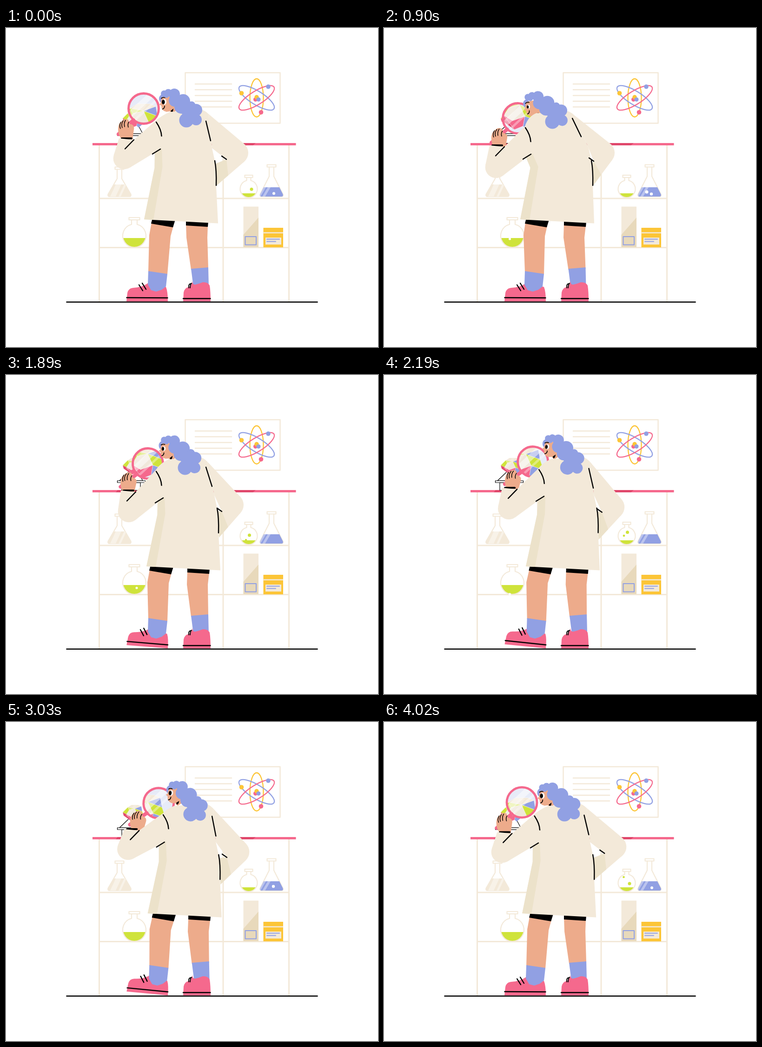
Write an HTML page with a canvas that moves like this. It is 800 px wide and 685 px high and loops after 4050 ms.

```html
<!DOCTYPE html>
<html lang="en">
<head>
<meta charset="utf-8">
<title>Lab researcher</title>
<style>
html, body { margin: 0; width: 100%; height: 100%; overflow: hidden; background: #fff; }
canvas { display: block; width: 800px; height: 685px; }
</style>
</head>
<body>
<canvas id="stage"></canvas>
<script>
const LOOP = 4050, STEP = 30;
const COAT = '#f3e9d9', SHADE = '#ece2ca', SKIN = '#edab8b', LILAC = '#91a0e3',
  PINK = '#f5698d', ROSE = '#e0486c', LIME = '#cfe33b', YELLOW = '#fcc537', INK = '#000';

const canvas = document.getElementById('stage');
const g = canvas.getContext('2d');
const ratio = window.devicePixelRatio || 1;
canvas.width = 800 * ratio;
canvas.height = 685 * ratio;
g.scale(ratio, ratio);
g.lineCap = g.lineJoin = 'round';

// Pose columns: start, lean in, closest, step back, furthest, upright
const TIMES = [0, 900, 1380, 1480, 1890, 2610, 3540];
const COLUMN = [0, 1, 2, 2, 3, 4, 5];
const HEAD = {
  x: [388, 362, 360, 385, 401, 390], y: [198, 201, 203, 199, 198, 198],
  turn: [0, -5, -5.5, 3, 9, 5], eye: [1, .65, .55, .8, .85, 1], drop: [0, 3, 3, 1, 0, 0]
};
const GLASS = {
  x: [296, 288, 287, 305, 334, 314], y: [173, 194, 195, 190, 181, 169],
  turn: [0, 3, 3, 5, 9, 8],
  gemX: [288, 284, 284, 297, 298, 296], gemY: [197, 184, 184, 188, 190, 192]
};
const ARM = {
  elbowX: [254, 241, 240, 264, 271, 251], elbowY: [280, 299, 300, 293, 279, 269],
  wristX: [275, 259, 257, 279, 291, 278], wristY: [240, 255, 257, 251, 238, 230],
  shoulderX: [323, 304, 301, 323, 341, 331], shoulderY: [202, 214, 216, 207, 200, 199],
  pitX: [332, 316, 314, 338, 348, 331], pitY: [260, 271, 272, 264, 258, 258]
};
const BODY = {
  seamX: [430, 405, 402, 430, 448, 434], seamY: [200, 194, 194, 198, 203, 201],
  seamRun: [10, 19, 20, 13, 7, 10],
  elbowX: [496, 471, 467, 486, 497, 499], elbowY: [268, 268, 268, 279, 287, 268],
  foldX: [464, 441, 443, 454, 463, 466], foldY: [275, 279, 283, 286, 289, 276],
  sideX: [449, 446, 444, 454, 460, 452], sideY: [285, 285, 283, 286, 285, 285],
  hem: [0, -4, -5, 5, 10, 3]
};
const LEGS = {
  thighL: [0, -9, -10, -4, 2, 1], kneeL: [0, -8, -9, -4, 0, 1], sockL: [0, -3, -3, 0, 3, 1],
  thighR: [0, 0, 0, 3, 6, 3], kneeR: [0, -2, -2, 1, 4, 1], sockR: [0, -1.5, -1.5, 0, 2, 1],
  toe: [0, 0, 0, 4.5, 6.5, 2.5]
};

// Monotone cubic through a looping track
function sample(values, t) {
  const n = TIMES.length;
  const time = i => TIMES[(i + n) % n] + LOOP * Math.floor(i / n);
  const val = i => values[COLUMN[(i + n) % n]];
  const slope = i => (val(i + 1) - val(i)) / (time(i + 1) - time(i));
  const tangent = i => {
    const a = slope(i - 1), b = slope(i);
    return a * b > 0 ? 2 * a * b / (a + b) : 0;
  };
  let i = n - 1;
  while (TIMES[i] > t) i--;
  const h = time(i + 1) - time(i), u = (t - time(i)) / h, v = 1 - u;
  return v * v * (1 + 2 * u) * val(i) + u * u * (3 - 2 * u) * val(i + 1)
    + h * u * v * (v * tangent(i) - u * tangent(i + 1));
}
const pose = (track, t) =>
  Object.fromEntries(Object.entries(track).map(([k, v]) => [k, sample(v, t)]));

function trace(points) {
  g.beginPath();
  points.forEach(([x, y]) => g.lineTo(x, y));
}
function poly(color, ...points) {
  trace(points);
  g.closePath();
  g.fillStyle = color;
  g.fill();
}
function line(color, width, ...points) {
  trace(points);
  g.strokeStyle = color;
  g.lineWidth = width;
  g.stroke();
}
function rect(color, x, y, w, h) {
  g.fillStyle = color;
  g.fillRect(x, y, w, h);
}
function frame(color, width, x, y, w, h) {
  g.strokeStyle = color;
  g.lineWidth = width;
  g.strokeRect(x, y, w, h);
}
function disc(color, x, y, rx, ry = rx) {
  g.beginPath();
  g.ellipse(x, y, rx, ry, 0, 0, 7);
  g.fillStyle = color;
  g.fill();
}
function fillPath(color, d) {
  g.fillStyle = color;
  g.fill(new Path2D(d));
}
function strokePath(color, width, d) {
  g.strokeStyle = color;
  g.lineWidth = width;
  g.stroke(new Path2D(d));
}
function group(x, y, degrees, ox, oy, draw) {
  g.save();
  g.translate(x, y);
  g.rotate(degrees * Math.PI / 180);
  g.translate(-ox, -oy);
  draw();
  g.restore();
}
function tangentPoint([px, py], cx, cy, r, side) {
  const dx = px - cx, dy = py - cy;
  const a = Math.atan2(dy, dx) + side * Math.acos(Math.min(1, r / Math.hypot(dx, dy)));
  return [cx + r * Math.cos(a), cy + r * Math.sin(a)];
}

function board() {
  frame(COAT, 2.5, 385.5, 96, 204, 108.5);
  for (let i = 0; i < 5; i++) line(COAT, 2.5, [407, 120.3 + i * 12.3], [485, 120.3 + i * 12.3]);
  [[YELLOW, 90, 41], [LILAC, 32, 44], [PINK, -32, 44]].forEach(([color, deg, a]) => {
    g.beginPath();
    g.ellipse(539, 150, a, 14.5, deg * Math.PI / 180, 0, 7);
    g.strokeStyle = color;
    g.lineWidth = 2.3;
    g.stroke();
  });
  disc(PINK, 536.5, 153.5, 4.5);
  disc(YELLOW, 539, 148.5, 4.7);
  disc(LILAC, 543, 153.5, 4.5);
  disc(LILAC, 564, 126, 4.8);
  disc(YELLOW, 506.5, 140, 4.8);
  disc(PINK, 548.5, 181, 4.8);
}

function shelves() {
  [200.5, 467, 608.5].forEach(x => line(COAT, 3, [x, 252], [x, 587]));
  line(COAT, 3, [330.5, 252], [330.5, 366]);
  [366, 471.5].forEach(y => line(COAT, 3, [200.5, y], [608.5, y]));
  rect(PINK, 186, 247, 437.5, 5);
  poly(ROSE, [430, 247], [537, 247], [531, 252], [430, 252]);
  poly(ROSE, [240, 247], [286, 247], [282, 252], [236, 252]);
}

function liquid(path, color, top, stripes) {
  g.save();
  g.clip(path);
  rect(color, 200, top, 420, 80);
  g.globalAlpha = .38;
  stripes.forEach(([x, w]) => poly('#fff', [x, top], [x + w, top], [x + w - 13, 364], [x - 13, 364]));
  g.restore();
}
function cone(x, rim, color, top, stripes) {
  const path = new Path2D(`M${x - 5} ${rim + 5}V${rim + 25}L${x - 24.5} 357Q${x - 26} 362 ${x - 21} 362
    H${x + 21}Q${x + 26} 362 ${x + 24.5} 357L${x + 5} ${rim + 25}V${rim + 5}`);
  g.fillStyle = '#fff';
  g.fill(path);
  g.strokeStyle = COAT;
  g.lineWidth = 2.2;
  g.stroke(path);
  liquid(path, color, top, stripes);
  frame(COAT, 2.2, x - 9.5, rim, 19, 5);
}
function round(x, y, r, rim, half, rimHalf, top) {
  const neck = y - Math.sqrt(r * r - half * half);
  const path = new Path2D(`M${x - half} ${rim + 5}V${neck}A${r} ${r} 0 1 0 ${x + half} ${neck}V${rim + 5}`);
  g.fillStyle = '#fff';
  g.fill(path);
  liquid(path, LIME, top, []);
  g.strokeStyle = COAT;
  g.lineWidth = 2.2;
  g.stroke(path);
  frame(COAT, 2.2, x - rimHalf, rim, rimHalf * 2, 5);
}

// x, start y, start time, life, radius, speed, colour
const BUBBLES = [
  [270.5, 471, 470, 470, 2.5, .042, '#fff'], [282, 471, 905, 490, 2.5, .042, '#fff'],
  [281, 471, 1560, 470, 2.5, .042, '#fff'], [270.5, 471, 2180, 470, 2.5, .042, '#fff'],
  [271, 471, 3110, 470, 2.5, .042, '#fff'], [281, 471, 3520, 470, 2.5, .042, '#fff'],
  [565, 362, 440, 850, 3.5, .0216, '#fff'], [575, 362, 640, 850, 3.2, .0216, '#fff'],
  [575, 362, 2610, 850, 3.2, .0216, '#fff'], [576, 362, 3740, 850, 3, .0216, '#fff'],
  [523.5, 356, 1340, 1050, 3.5, .0216, LIME], [528, 356, 3600, 1000, 3.5, .0216, LIME],
  [516, 355, 1870, 700, 2.4, .031, LIME], [515.5, 355, 3310, 740, 2.3, .031, LIME]
];

function shelfItems(t) {
  cone(244, 298.5, COAT, 336, [[236, 12], [254, 5]]);
  cone(571, 293.5, LILAC, 342, [[563, 6], [554, 5]]);
  round(276, 446, 25, 407, 6, 11.5, 451);
  round(522, 345.5, 18.5, 316, 4.5, 8.5, 355);
  BUBBLES.forEach(([x, y, start, life, r, speed, color]) => {
    const age = (t - start + LOOP) % LOOP;
    if (age < life) disc(color, x, y - age * speed, r);
  });
  rect(COAT, 510.5, 383.5, 32.5, 87);
  poly('#e8d9bb', [510.5, 444], [543, 407], [543, 470.5], [510.5, 470.5]);
  frame(LILAC, 2, 514.5, 448, 23.5, 17.5);
  rect(YELLOW, 553.5, 429, 42.5, 42);
  rect(COAT, 553.5, 438.5, 42.5, 2.5);
  rect(COAT, 558, 450, 34, 15);
  line(LILAC, 2, [561, 453.5], [588, 453.5]);
  line(LILAC, 2, [561, 458.5], [580, 458.5]);
}

const GEM = [
  [COAT, [-11, -13], [-3, -18], [11, -18], [18, -15], [4, -10], [-8, -7]],
  [LIME, [-22, -2], [-11, -13], [-8, -7], [-14, 3]],
  ['#e1eb86', [-11, -13], [-8, -7], [4, -10]],
  ['#f0e8db', [-8, -7], [4, -10], [10, 3], [-4, 8], [-14, 2]],
  [LILAC, [4, -10], [18, -15], [20, -4]],
  [LIME, [4, -10], [20, -4], [24, 8], [10, 3]],
  [PINK, [-14, 2], [-4, 8], [10, 3], [8, 14], [-2, 18]],
  [ROSE, [-22, -2], [-14, 2], [-2, 18], [-20, 5]],
  [LILAC, [10, 3], [24, 8], [12, 18], [8, 14]]
];
function gem(x, y, scale) {
  g.save();
  g.translate(x, y);
  g.scale(scale, scale);
  GEM.forEach(([color, ...pts]) => {
    poly(color, ...pts);
    line('rgba(255,255,255,.45)', .5, ...pts, pts[0]);
  });
  poly('rgba(255,255,255,.22)', [-16, 4], [2, -17], [8, -17], [-11, 9]);
  g.restore();
}
function stand() {
  line(INK, 1.2, [263, 209], [244, 227], [294, 227], [284, 208]);
  frame(INK, 1.2, 249, 231, 40, 16.5);
  rect('#fff', 239.5, 227, 60, 4);
  frame(INK, 1.2, 239.5, 227, 60, 4);
}

function magnifier(p) {
  g.save();
  g.beginPath();
  g.arc(p.x, p.y, 32, 0, 7);
  g.clip();
  rect('#e7ebf8', p.x - 34, p.y - 34, 68, 68);
  gem(p.gemX, p.gemY, 1.9);
  g.translate(p.x, p.y);
  g.rotate(-.75);
  rect('rgba(255,255,255,.5)', -40, -17, 80, 13);
  rect('rgba(255,255,255,.35)', -40, 3, 80, 5);
  g.restore();
  group(p.x, p.y, p.turn, 296, 173, () => {
    line(PINK, 8, [274, 198], [242, 228]);
    g.beginPath();
    g.arc(296, 173, 32.5, 0, 7);
    g.lineWidth = 4.8;
    g.stroke();
    fillPath(SKIN, 'M248 238C238 224 240 206 247 202Q254 193 263 197L266 206Q277 207 275 218L272 240Z');
    strokePath(INK, 1.5, 'M247 202Q243 209 246 216M252 199Q247 206 250 214M257 198Q253 204 255 212M264 202Q261 207 263 213');
  });
}

function legs(p) {
  const a = p.thighL, b = p.kneeL, c = p.sockL, d = p.thighR, e = p.kneeR, f = p.sockR;
  group(348, 587, p.toe, 348, 587, () => {
    fillPath(PINK, 'M259 587L261 569Q263 559 273 558Q293 557 305 548L344 556Q348 566 348 587Z');
    line(INK, 2.4, [259.5, 579], [347.5, 579.5]);
    line(INK, 2.3, [286, 551.5], [294, 564]);
    line(INK, 2.3, [293, 548], [301, 561]);
  });
  poly(SKIN, [313 + a, 418], [360 + a, 425], [354 + b, 447], [347 + c, 529], [306 + c, 524], [308 + b, 445]);
  poly(LILAC, [306 + c, 522], [347 + c, 528], [344 + c, 555], [335 + c, 562], [323 + c, 566], [312 + c, 563], [305 + c, 551]);
  poly(INK, [315 + a, 408], [364 + a, 412], [359 + a, 428], [312 + a, 420]);

  poly(SKIN, [387 + d, 420], [434 + d, 424], [433 + e, 450], [435 + f, 517], [398 + f, 519], [388 + e, 450]);
  poly(LILAC, [398 + f, 517], [435 + f, 514], [436 + f, 556], [403 + f, 556]);
  fillPath(PINK, 'M381 587L382 568Q384 558 393 556Q400 552 401 543Q401 552 407 551Q416 549 423 546Q434 545 438 553Q440 566 440 587Z');
  line(INK, 2.4, [381, 581], [439.5, 581]);
  strokePath(INK, 1.9, 'M393 558Q392 550 397 549M396 558Q396 551 399 548');
  poly(INK, [387 + d, 413], [435 + d, 416], [434 + d, 427], [387 + d, 424]);
}

const CURLS = [
  [340, 141, 7], [349, 139, 8], [362, 142, 12], [345, 144, 6], [363, 156, 13], [381, 157, 15],
  [377, 169, 15], [399, 166, 8.5], [409, 176, 13], [392, 178, 15], [388, 198, 15.5], [409, 197, 12]
];
function face(p) {
  group(p.x, p.y + p.drop, p.turn, 388, 198, () => {
    disc(LILAC, 336, 152, 7, 9);
    fillPath(SKIN, 'M336 148Q333 156 333 161L329.5 164L334 167Q334 178 345 180L352 179L358 184L372 172L364 145Z');
    poly(INK, [354, 178], [360, 173], [359, 179], [356, 182]);
    disc('#fff', 340.5, 158.5, 4.5 * p.eye, 6.3 * p.eye);
    disc(INK, 338.3, 159, 3.3 * p.eye, 5 * p.eye);
    strokePath(INK, 1.7, 'M334 151Q338 148 342 149.5M341 167.5Q341 173 336.5 174');
  });
}
function hair(p) {
  group(p.x, p.y, p.turn, 388, 198, () => CURLS.forEach(c => disc(LILAC, ...c)));
}

function coat(b, arm, head) {
  const top = [head.x + 48, head.y - 13];
  const hand = [b.sideX + 4, b.elbowY + 70];
  const outer = tangentPoint(top, b.elbowX, b.elbowY, 25, 1);
  const under = tangentPoint(hand, b.elbowX, b.elbowY, 25, -1);
  const fold = [b.foldX + 10, b.foldY + 7];
  const pit = [b.sideX - 6, 258];
  poly(COAT, top, outer, [b.elbowX, b.elbowY], under, hand, fold, pit);
  disc(COAT, b.elbowX, b.elbowY, 25);
  poly(SHADE, [b.sideX, 292], fold,
    [hand[0] + .42 * (under[0] - hand[0]), hand[1] + .42 * (under[1] - hand[1])], hand);

  const waist = 319.5 + b.hem * 1.2;
  g.beginPath();
  g.moveTo(arm.shoulderX - 1, arm.shoulderY - 3);
  g.quadraticCurveTo(head.x - 52, head.y - 11, head.x - 35, head.y - 18);
  g.lineTo(head.x + 35, head.y - 22);
  g.quadraticCurveTo(head.x + 42, head.y - 19, ...top);
  [pit, [b.sideX, b.sideY], [b.sideX + 3, b.sideY + 54], [456 + b.hem, 419.5],
    [297 + b.hem, 411], [waist, 300], [arm.pitX - 12, arm.pitY]].forEach(q => g.lineTo(...q));
  g.fillStyle = COAT;
  g.fill();
  poly(SHADE, [arm.pitX - 12, arm.pitY + 4], [arm.pitX + 3, arm.pitY - 2], [waist + 17, 298],
    [317 + b.hem, 412], [297 + b.hem, 411], [waist, 300]);

  line(INK, 2.4, [b.foldX, b.foldY], fold);
  strokePath(INK, 2.4, `M${b.sideX} ${b.sideY}q4 20 3 53`);
  line(INK, 2.4, [b.seamX, b.seamY], [b.seamX + b.seamRun, b.seamY + 42 - (b.seamRun - 10) * .3]);
}

function sleeve(a) {
  const wrist = [a.wristX, a.wristY], cuff = [a.wristX - 32, a.wristY - 3], pit = [a.pitX, a.pitY];
  line(INK, 4, [a.wristX - 26, a.wristY - 3], [a.wristX - 5, a.wristY - 3]);
  poly(COAT, [a.shoulderX - 1, a.shoulderY - 3], wrist, cuff,
    tangentPoint(cuff, a.elbowX, a.elbowY, 23.3, -1), [a.elbowX, a.elbowY],
    tangentPoint(pit, a.elbowX, a.elbowY, 23.3, 1), pit, [a.shoulderX + 12, a.shoulderY + 31]);
  disc(COAT, a.elbowX, a.elbowY, 23.3);
  line(INK, 2.4, wrist, [a.wristX - 19, a.wristY + 19.5]);
  line(INK, 2.4, pit, [a.pitX - 17, a.pitY + 10.5]);
  strokePath(INK, 2.4, `M${a.shoulderX} ${a.shoulderY}q11 16 11.5 30`);
}

function draw(t) {
  const head = pose(HEAD, t), arm = pose(ARM, t);
  rect('#fff', 0, 0, 800, 685);
  board();
  shelves();
  shelfItems(t);
  stand();
  gem(273, 196, 1);
  line(INK, 2.5, [130.5, 588.5], [669.5, 588.5]);
  legs(pose(LEGS, t));
  magnifier(pose(GLASS, t));
  face(head);
  coat(pose(BODY, t), arm, head);
  sleeve(arm);
  hair(head);
}

const began = performance.now();
function tick() {
  const t = (performance.now() - began) % LOOP;
  draw(Math.floor(t / STEP) * STEP);
  requestAnimationFrame(tick);
}
tick();
</script>
</body>
</html>
```
